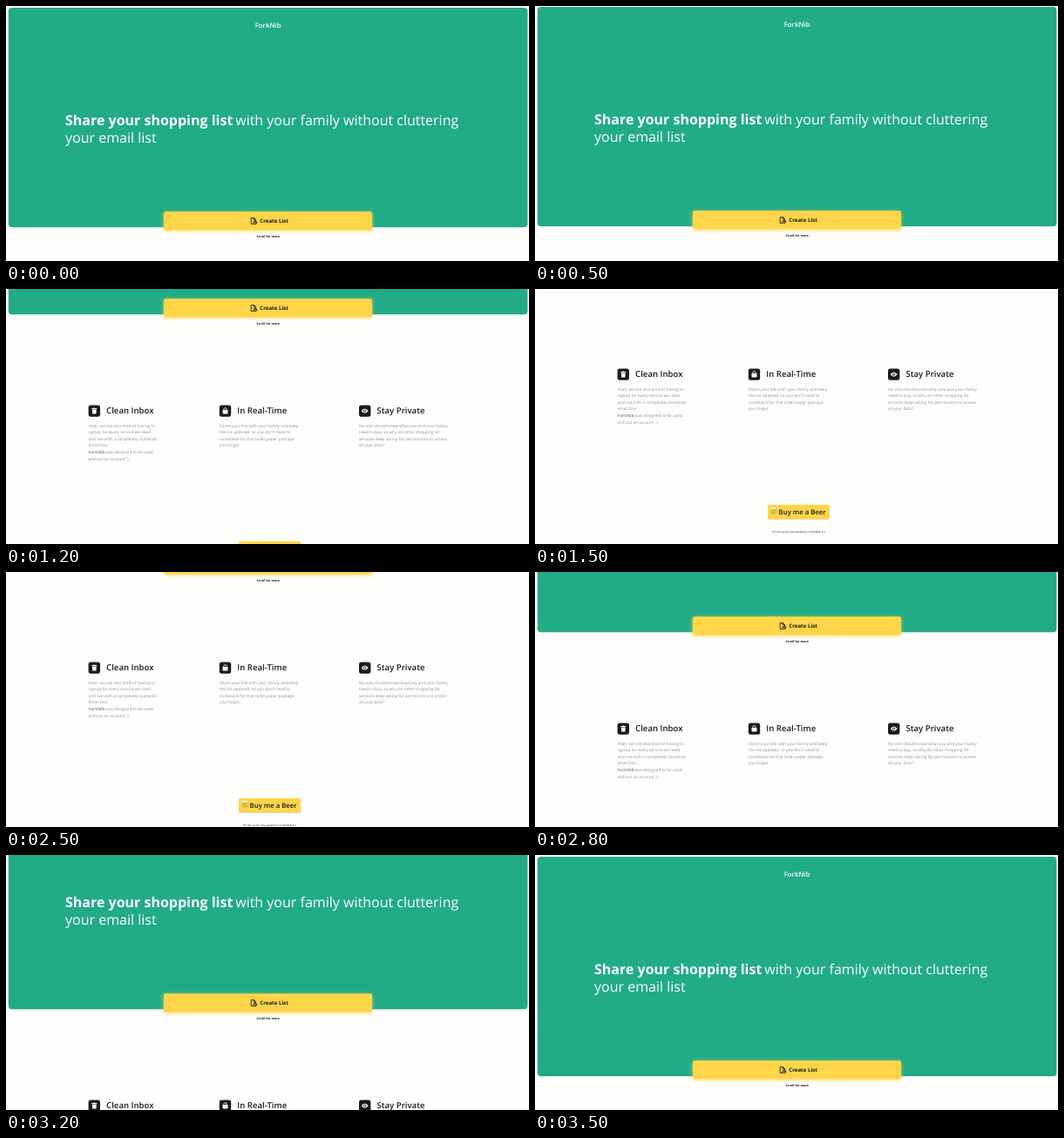
These frames come from a looping animation (600x293 px, 3.7 s). An HTML page:

```html
<!DOCTYPE html>
<html lang="en">
<head>
<meta charset="utf-8">
<title>Shopping list page</title>
<style>
  html, body { margin: 0; width: 100%; height: 100%; overflow: hidden; background: #fefefd; }
  svg { display: block; width: 100%; height: 100%; }
  text { font-family: "Open Sans", "Noto Sans", sans-serif; text-rendering: geometricPrecision; fill: #1b1b1d; }
  .white { fill: #fff; }
  .hero { font-size: 16px; }
  .bold { font-weight: 700; }
  .semi { font-weight: 600; }
  .title { font-size: 9.6px; font-weight: 600; }
  .copy { font-size: 4.72px; fill: #929292; }
  .mid { text-anchor: middle; }
  .line { fill: none; stroke: #1b1b1d; stroke-width: .9; stroke-linejoin: round; stroke-linecap: round; }
</style>
</head>
<body>
<svg viewBox="0 0 600 293">
  <defs>
    <filter id="glow" x="-10%" y="-60%" width="120%" height="220%">
      <feGaussianBlur stdDeviation="2.2"/>
    </filter>
    <filter id="soft" x="-10%" y="-30%" width="120%" height="160%">
      <feGaussianBlur stdDeviation=".7"/>
    </filter>
  </defs>
  <g id="page">
    <rect x="2.8" y="2" width="595.6" height="252.2" rx="4" fill="#21ab87"/>
    <text class="white semi mid" x="300.6" y="24.5" font-size="7.8">ForkNib</text>
    <text class="white hero bold" x="68" y="136.5">Share your shopping list</text>
    <text class="white hero" x="263.2" y="136.5">with your family without cluttering</text>
    <text class="white hero" x="68" y="156.7">your email list</text>

    <rect x="181" y="237" width="239" height="21.5" rx="2" fill="#ffd54a" opacity=".8" filter="url(#glow)"/>
    <rect x="181" y="236.2" width="239" height="21.4" rx="2" fill="#ffd54a"/>
    <g class="line">
      <path d="M283.8 250.4H281.2V243.6H284.6L286.6 245.6V246.6M284.4 243.8V245.8H286.4"/>
      <circle cx="285.8" cy="248.9" r="1.8"/>
      <path d="M285.8 248V249H286.6"/>
    </g>
    <text class="bold" x="291.3" y="249.4" font-size="6.1">Create List</text>
    <text class="bold mid" x="300.7" y="266.3" font-size="3.6">Scroll for more</text>

    <g id="features"></g>

    <rect x="267" y="515.5" width="71" height="16.2" rx="1.5" fill="#a08a40" opacity=".4" filter="url(#soft)"/>
    <rect x="267" y="515" width="71" height="16.2" rx="1.5" fill="#ffd54a"/>
    <g>
      <path d="M276 520.6h1.3q.9 0 .9 1v1.6q0 1-.9 1H276" fill="none" stroke="#c9b27a" stroke-width=".7"/>
      <rect x="271" y="519.4" width="5.2" height="6" rx=".6" fill="#e3a83a"/>
      <path d="M272.6 521v3.4M274.5 521v3.4" stroke="#f6d277" stroke-width=".6"/>
      <rect x="270.4" y="517.8" width="6.3" height="2.3" rx="1.1" fill="#fff7e2"/>
    </g>
    <text class="semi" x="279.6" y="526.4" font-size="7.75">Buy me a Beer</text>
    <text class="mid" x="302.5" y="547" font-size="3.12">Hit me up for any questions or feedback :)</text>
  </g>
</svg>
<script>
const LOOP = 3700;

// Icons are drawn around the centre of their 13px tile.
const features = [
  { x: 94.6, title: "Clean Inbox",
    icon: '<path d="M-3-3h2l.4-.6h1.2l.4.6h2v1h-6zM-2.5-1.5h5l-.4 4.9h-4.2z"/>',
    lines: ["Yeah, we are also tired of having to", "signup for every service we need",
      "and live with a completely clustered", "email box.",
      '<tspan class="bold">ForkNib</tspan> was designed to be used', "without an account :)"] },
  { x: 244.8, title: "In Real-Time",
    icon: '<path d="M-3-1h6v3.4q0 1-1 1h-4q-1 0-1-1z"/>' +
      '<path d="M-1.6-.4v-1.5a1.6 1.6 0 0 1 3.2 0v1.5" fill="none" stroke="#fff" stroke-width=".9"/>',
    lines: ["Share your link with your family and keep", "the list updated, so you don't need to",
      "comeback for that toilet paper package", "you forgot."] },
  { x: 405, title: "Stay Private",
    icon: '<path d="M-4 0Q0-5.4 4 0Q0 5.4-4 0z"/><circle r="1.7" fill="#1b1b1d"/><circle r=".9"/>',
    lines: ["No one should know what you and your family", "need to buy, so why do other shopping list",
      "services keep asking for permissions to access", "all your data?"] }
];

document.getElementById("features").innerHTML = features.map(({ x, title, icon, lines }) => `
  <rect x="${x}" y="358.5" width="13.4" height="13.2" rx="2.6" fill="#1b1b1d"/>
  <g class="white" transform="translate(${x + 6.7} 365.1)">${icon}</g>
  <text class="title" x="${x + 20.5}" y="368.4">${title}</text>
  ${lines.map((line, i) =>
    `<text class="copy" x="${x}" y="${383.7 + i * 7.57}">${line}</text>`).join("")}`).join("");

// Scroll offsets, one per 100 ms, after each start time.
const scrolls = [
  [500, [1, 22, 58, 98, 135, 169, 199, 225, 246, 260, 267]],
  [2500, [255, 234, 210, 185, 160, 135, 107, 77, 46, 18, 0]]
];
const pose = (time, y) => ({ offset: time / LOOP, transform: `translateY(${-y}px)`, easing: "step-end" });
const frames = [
  pose(0, 0),
  ...scrolls.flatMap(([start, offsets]) => offsets.map((y, i) => pose(start + i * 100, y))),
  pose(LOOP, 0)
];
document.getElementById("page").animate(frames, { duration: LOOP, iterations: Infinity });
</script>
</body>
</html>
```
